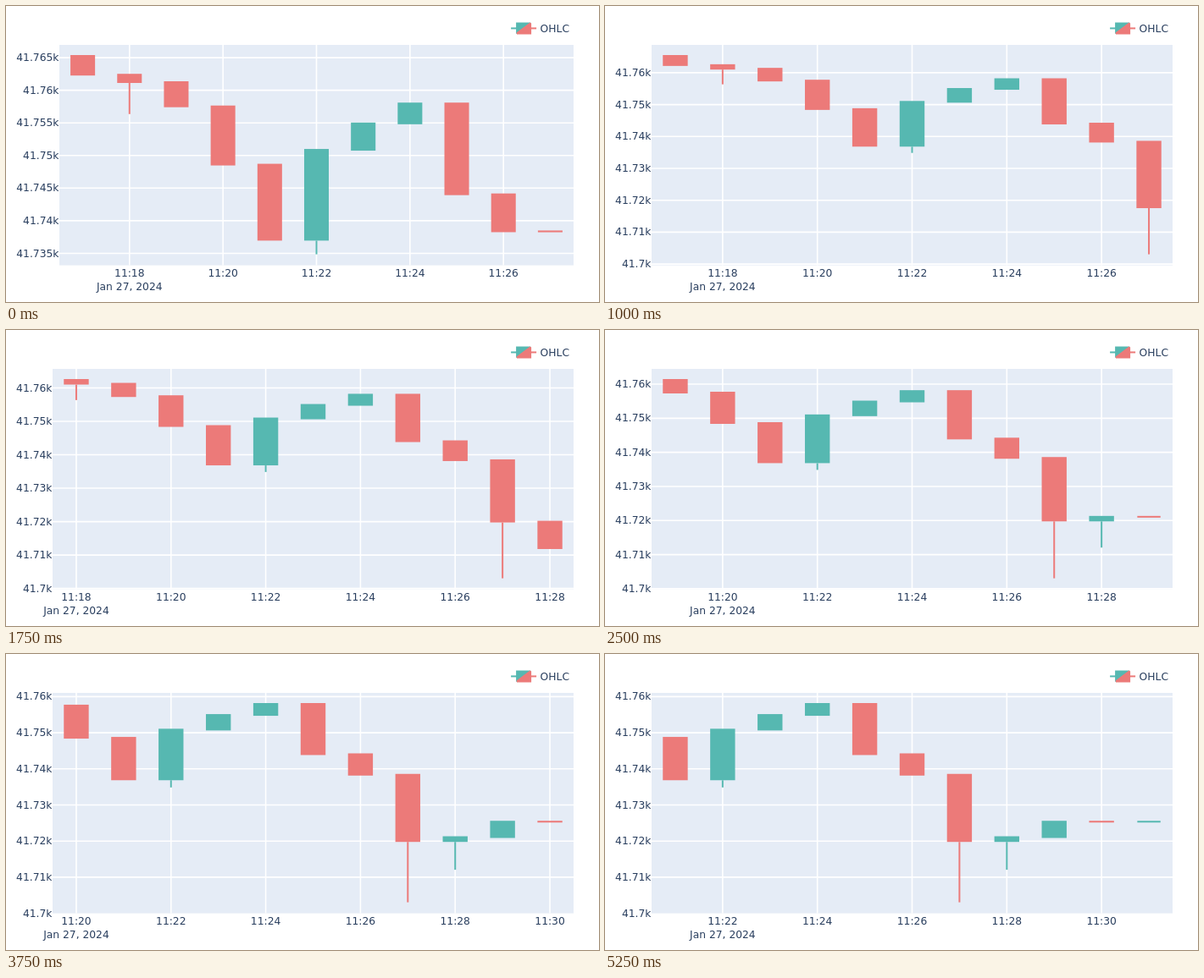
An HTML page with a canvas that plays this animation: 700 by 350 pixels, repeating every 6250 ms.

```html
<!DOCTYPE html>
<html lang="en">
<head>
<meta charset="utf-8">
<title>Live candlestick chart</title>
<style>
  html, body { margin: 0; width: 100%; height: 100%; overflow: hidden; background: #fff; }
  canvas { display: block; }
</style>
</head>
<body>
<canvas id="chart" width="700" height="350"></canvas>
<script>
const ctx = document.getElementById('chart').getContext('2d');
const UP = '#56b8b1', DOWN = '#ec7a79', INK = '#2a3f5f', PAPER = '#e5ecf6';
const LOOP = 6250, BEAT = 250, BASE = 41700, SLOTS = 11, FIRST = 17, LIVE = 27;
const TOP = 46, BOTTOM = 306.6, RIGHT = 670, PAD = 13;

// Turning points of the price above BASE, minute by minute.
// A minute opens at the previous close; its low and close follow from its trades.
const OPENING = 65.27;
const trades = [
  [62.39], [56.35, 61.25], [57.53], [48.6], [37.08],
  [34.85, 50.87], [54.92], [57.98], [44.05], [38.37],
  [38.36, 3.05, 7.2, 11.95, 17.79, 20], [19.99, 12.06, 21.1],
  [21.1, 21.11, 25.1, 25.38], [25.37, 25.38, 25.37], [25.36, 25.37]
];

// Beats at which the trades of each live minute arrive; a missing last one
// arrives as the next minute begins.
const arrivals = [[0, 2, 2, 3, 4], [5, 7], [10, 11, 12, 13], [15, 19], [20, 21]];

function visibleCandles(beat) {
  const live = arrivals.filter(a => a[0] <= beat).length - 1;
  const newest = LIVE - FIRST + live;
  const arrived = arrivals[live].filter(b => b <= beat).length;
  let open = OPENING;
  return trades.slice(0, newest + 1).map((all, i) => {
    const path = [open, ...(i === newest ? all.slice(0, arrived) : all)];
    const [before, close] = path.slice(-2);
    // A flat candle takes the direction of its last trade
    const rising = close > open || (close === open && close > before);
    const candle = {
      minute: FIRST + i, open, close, rising,
      low: Math.min(...path), high: Math.max(open, close)
    };
    open = close;
    return candle;
  }).slice(-SLOTS);
}

function text(label, x, y, align) {
  ctx.fillStyle = INK;
  ctx.textAlign = align;
  ctx.fillText(label, x, y);
}

function line(x1, y1, x2, y2) {
  ctx.beginPath();
  ctx.moveTo(x1, y1);
  ctx.lineTo(x2, y2);
  ctx.stroke();
}

function drawLegendHalf(color, side) {
  ctx.fillStyle = ctx.strokeStyle = color;
  line(15 * side, 0, 8 * side, 0);
  ctx.beginPath();
  ctx.moveTo(8 * side, -6 * side);
  ctx.lineTo(8 * side, 6 * side);
  ctx.lineTo(-8 * side, 6 * side);
  ctx.closePath();
  ctx.fill();
  ctx.stroke();
}

function drawLegend() {
  ctx.save();
  ctx.translate(611.1, 26.4);
  ctx.lineWidth = 2;
  ctx.miterLimit = 2;
  drawLegendHalf(UP, -1);
  drawLegendHalf(DOWN, 1);
  ctx.restore();
  text('OHLC', 630.6, 31.2, 'left');
}

function drawChart(beat) {
  const candles = visibleCandles(beat);
  const high = Math.max(...candles.map(c => c.high));
  const low = Math.min(...candles.map(c => c.low));
  const scale = (BOTTOM - TOP - 2 * PAD) / (high - low);
  const step = high - low < 40 ? 5 : 10;
  const left = step === 5 ? 63 : 55;
  const slot = (RIGHT - left) / SLOTS;
  const yOf = value => TOP + PAD + (high - value) * scale;
  const xOf = minute => left + (minute - candles[0].minute + 0.5) * slot;

  ctx.fillStyle = '#fff';
  ctx.fillRect(0, 0, 700, 350);
  ctx.fillStyle = PAPER;
  ctx.fillRect(left, TOP, RIGHT - left, BOTTOM - TOP);

  // Labels may sit a pixel below the plot, grid lines may not
  ctx.strokeStyle = '#fff';
  ctx.lineWidth = 1.6;
  const lowest = Math.ceil((low - (PAD + 1) / scale) / step) * step;
  for (let v = lowest; yOf(v) >= TOP; v += step) {
    const y = yOf(v);
    if (y < BOTTOM) line(left, y, RIGHT, y);
    text((BASE + v) / 1000 + 'k', left - 0.6, y + 4.1, 'right');
  }
  candles.filter(c => c.minute % 2 === 0).forEach(({ minute }, i) => {
    const x = xOf(minute);
    line(x, TOP, x, BOTTOM);
    text('11:' + minute, x, 320, 'center');
    if (i === 0) text('Jan 27, 2024', x, 336, 'center');
  });

  ctx.lineWidth = 2;
  for (const c of candles) {
    const x = xOf(c.minute), top = yOf(c.high) - 1;
    const bottom = yOf(Math.min(c.open, c.close)) + 1;
    const width = slot * 0.49 + (c.open === c.close ? 0 : 2);
    ctx.fillStyle = ctx.strokeStyle = c.rising ? UP : DOWN;
    ctx.fillRect(x - width / 2, top, width, bottom - top);
    if (yOf(c.low) > bottom) line(x, bottom, x, yOf(c.low));
  }
  drawLegend();
}

ctx.font = '12.3px "DejaVu Sans", sans-serif';
const began = performance.now();

function tick() {
  const time = (performance.now() - began) % LOOP;
  drawChart(Math.floor(time / BEAT));
  requestAnimationFrame(tick);
}
tick();
</script>
</body>
</html>
```
